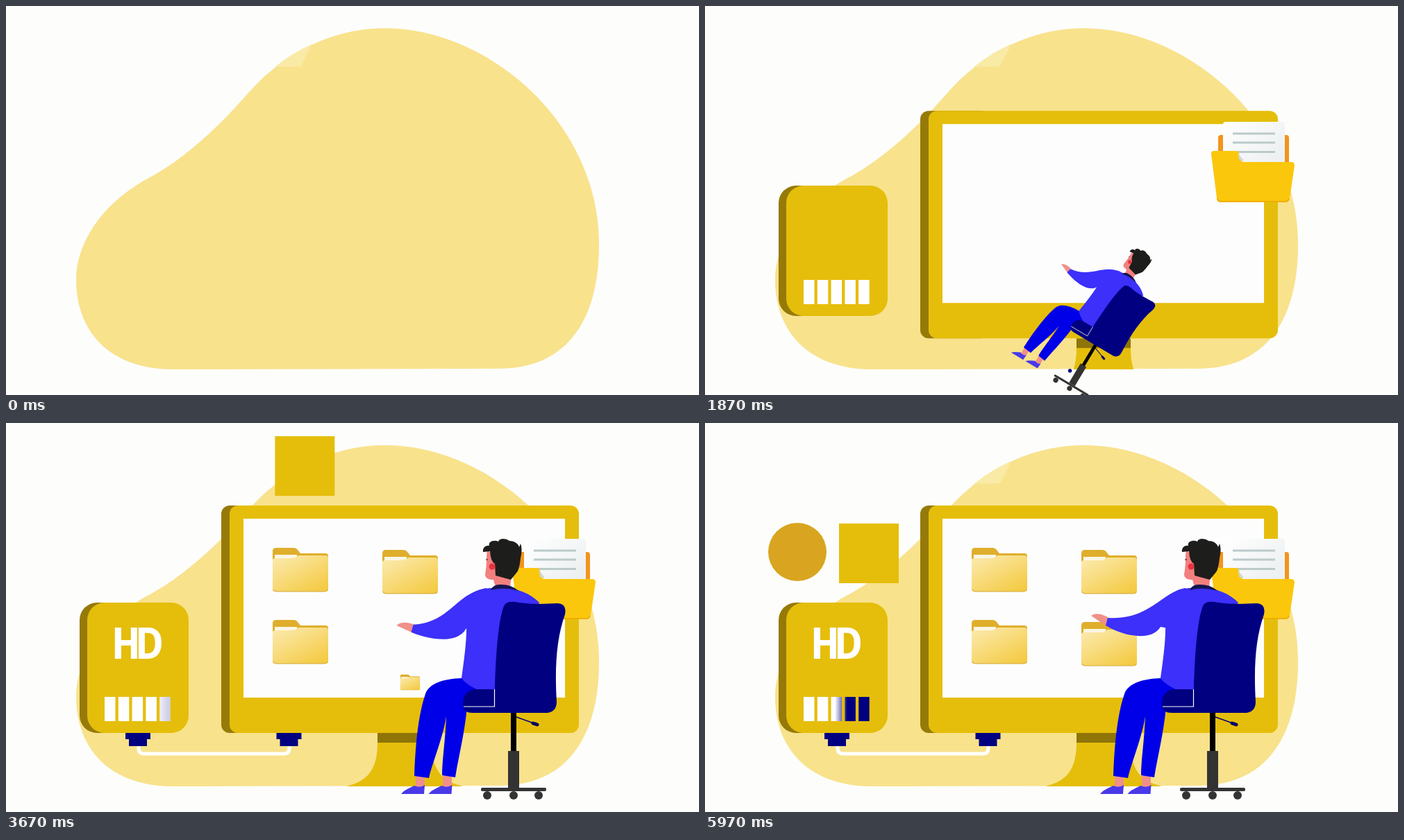
These frames come from a looping animation (998 by 561 pixels, 6010 ms). An HTML page:

```html
<!DOCTYPE html>
<html lang="en">
<head>
<meta charset="utf-8">
<title>Backup drive</title>
<style>
  html, body { margin: 0; width: 100%; height: 100%; overflow: hidden; background: #fdfdfc; }
  svg { display: block; width: 100vw; height: 100vh; }
  text { font: 700 63px "Noto Sans Mono", "DejaVu Sans Mono", monospace; font-stretch: 75%; fill: #fff; text-anchor: middle; }
</style>
</head>
<body>
<svg viewBox="0 0 998 561">
  <defs>
    <clipPath id="floor"><rect width="998" height="524"/></clipPath>
    <linearGradient id="sheen" x1="0" y1="0" x2=".8" y2="1">
      <stop stop-color="#fcebb2"/><stop offset="1" stop-color="#f4cb45"/>
    </linearGradient>
    <linearGradient id="paper" x1="0" y1="0" x2="1" y2="1">
      <stop stop-color="#fff"/><stop offset="1" stop-color="#e6ebed"/>
    </linearGradient>
    <linearGradient id="charge" gradientUnits="userSpaceOnUse" y1="0" y2="0">
      <stop id="left"/><stop id="right" offset="1"/>
    </linearGradient>
    <path id="plug" fill="#000080" d="M-18 447h36v9h-5v10h-26v-10h-5z"/>
    <g id="folder">
      <path fill="#dfae2c" d="M-40-27q0-5 5-5h25q4 0 6 3l4 5h36q4 0 4 4v47q0 4-4 4h-72q-4 0-4-4z"/>
      <path fill="#fbf6e4" d="M-37-22h32v6h-32z"/>
      <path fill="url(#sheen)" d="M-40-14q0-3 4-3h24q5 0 9-4h39q4 0 4 4v44q0 4-4 4h-72q-4 0-4-4z"/>
      <path fill="none" stroke="#d3a63a" d="M-39 28q1 3 4 3h70q3 0 4-3"/>
    </g>
  </defs>

  <path fill="#f8e28c" d="M240 524C150 524 101 470 101 395C101 340 140 285 200 251C260 220 310 170 352 122C397 72 465 32 546 32C694 32 855 168 854 345C854 450 810 523 710 523Z"/>
  <path fill="#f9eaa6" d="M387 88Q413 67 441 55L425 87Z"/>

  <use id="plugB" href="#plug"/>
  <g clip-path="url(#floor)">
    <g id="monitor">
      <path fill="#e5be0b" d="M535 455V461C535 503 518 517 490 524H658C630 517 613 503 613 461V455Z"/>
      <path fill="#8f7408" d="M535 447h78v14h-78z"/>
      <rect x="310" y="119" width="100" height="328" rx="12" fill="#967a08"/>
      <rect x="322" y="119" width="503" height="328" rx="12" fill="#e5be0b"/>
      <path fill="#fdfdfd" d="M342 138h463v258h-463z"/>
    </g>
  </g>
  <g id="icons"></g>

  <path id="cable" fill="none" stroke="#fff" stroke-width="5" pathLength="1" stroke-dasharray="1 2" d="M191 464V469Q191 477 199 477H400Q408 477 408 469V466"/>
  <use id="plugA" href="#plug"/>
  <g id="drive"><g transform="translate(-184.5 -353)">
    <rect x="106" y="259" width="120" height="188" rx="25" fill="#967a08"/>
    <rect x="117" y="259" width="146" height="188" rx="25" fill="#e5be0b"/>
    <path id="bars" fill="url(#charge)"/>
  </g></g>
  <g id="H"><text y="23">H</text></g>
  <g id="D"><text y="23">D</text></g>

  <rect id="square" x="-43" y="-43" width="86" height="86" fill="#e5be0b"/>
  <circle id="round" r="42" fill="#d9a520"/>

  <g id="files"><g transform="translate(-789 -225)">
    <rect x="739" y="186" width="102" height="80" rx="4" fill="#f3941c"/>
    <rect x="746" y="167" width="89" height="90" rx="4" fill="url(#paper)"/>
    <path stroke="#bccaca" stroke-width="3" d="M760 184h61M760 197h61M760 210.500h61"/>
    <path fill="#fbc70c" d="M729 213q0-4 4-4h31q4 0 5 4l5 12h70q5 0 5 5l-7 47q-1 6-7 6h-92q-6 0-6-6z"/>
    <path fill="#cfd8da" d="M767 212l9 11h-6z"/>
    <path fill="none" stroke="#efae00" stroke-width="2" d="M738 278q1 4 5 4h92q5 0 6-4"/>
  </g></g>

  <circle id="ball" r="64.500" fill="#000080"/>

  <g id="man"><g transform="translate(-731 -535)">
    <path fill="#f0908a" d="M590 508h13v18h-13zM629 508h13v18h-13z"/>
    <path id="shoe" fill="#4839ea" d="M569 535Q572 530 588 523Q596 527 603 522L602 535Z"/>
    <use href="#shoe" x="39.500"/>
    <path fill="#0000e8" d="M657 368C630 369 612 375 605 388C595 415 590 455 588 509L609 512C614 490 629 455 634 423C633 455 628 485 628 508L647 511C652 480 660 450 664 410L690 386Z"/>
    <path fill="#f2807f" d="M693 183C691 195 693 204 690 218Q690 226 702 226L706 240H726L728 212Z"/>
    <path fill="#1d1d1b" d="M687 186C686 180 691 176 696 177C694 171 703 168 709 171C711 165 721 167 725 170C732 170 738 174 739 179L741 174C744 182 742 190 741 195C740 205 738 213 736 215L727 226L705 220L704 203Q698 200 697 185Z"/>
    <circle cx="700" cy="207" r="4.500" fill="#e63340"/>
    <path stroke="#1d1d1b" d="M691 197h3"/>
    <path fill="#3c30fa" d="M688 239C710 236 745 235 768 259L730 390H690C670 381 660 374 656 368C660 340 664 310 663 288C668 265 676 245 688 239Z"/>
    <path fill="#15154e" d="M698 241Q702 232 713 233Q728 233 738 242Q718 236 698 241Z"/>
    <path id="hand" fill="#f0908a" d="M2 0C-6-3-18-5-24 2L-12 7L0 12Z"/>
    <path id="sleeve" fill="#3c30fa"/>
    <path d="M727 415h8v60h-8z"/>
    <g fill="#333">
      <path d="M723 473h16v53h-16z"/>
      <rect x="684" y="526" width="94" height="5" rx="2"/>
      <circle cx="693" cy="537" r="6"/><circle cx="731" cy="537" r="6"/><circle cx="767" cy="537" r="6"/>
    </g>
    <path stroke="#000080" stroke-width="1.500" d="M735 424L760 433"/>
    <path stroke="#000060" stroke-width="5" stroke-linecap="round" d="M759 433L765 435"/>
    <path fill="#000080" d="M716 267Q718 256 733 258C755 262 775 261 795 260Q808 261 805 276C793 310 790 350 793 402Q793 416 780 418H672Q659 418 658 408Q657 386 675 384H704C705 345 708 290 716 267Z"/>
    <path fill="none" stroke="#fff" stroke-width="1.200" d="M659 409H703.500V384"/>
  </g></g>
</svg>

<script>
const LOOP = 6010;
const BAR_CYCLE = 594;
const $ = id => document.getElementById(id);
const ramp = (t, start, end) => Math.min(1, Math.max(0, (t - start) / (end - start)));
const easeOut = p => 1 - (1 - p) ** 3;
const easeInOut = (p, n = 2) => p < .5 ? (2 * p) ** n / 2 : 1 - (2 - 2 * p) ** n / 2;
const swing = (t, start, end) => easeInOut(ramp(t, start, end));
const mix = (a, b, k) => a + (b - a) * k;

function place(el, x, y, scale = 1, turn = 0) {
  el.style.display = scale > .004 ? "" : "none";
  el.setAttribute("transform", `translate(${x} ${y}) rotate(${turn}) scale(${scale})`);
}

// Spins in from an offset while growing; may dip below its place before settling.
function tumble(id, p, x, y, { dx, dy, dip = 0, spin }) {
  const rest = 1 - p;
  const sink = dip * Math.sin(Math.PI * p ** 3);
  place($(id), x + dx * rest ** 2, y + dy * rest ** 2 + sink, Math.sin(p * Math.PI / 2), spin * rest ** 3);
}

// Flies from behind the man's head over the monitor to its place.
function hop(id, p, x, y, height) {
  const e = easeInOut(p);
  place($(id), mix(718, x, e), mix(188, y, e) - height * Math.sin(Math.PI * e), Math.min(1, p / .147));
}

function drawLetter(id, x, t, start) {
  const s = easeOut(ramp(t, start, start + 620));
  place($(id), x, 316.5 - 30 * (1 - s), s);
}

function drawPlug(id, x, t, start) {
  const p = ramp(t, start, start + 200);
  place($(id), x, -22 * (1 - easeOut(p)), p > 0 ? 1 : 0);
}

// Navy sweeps across the bars, then white sweeps over it.
function drawBars(t) {
  const phase = ((t + LOOP) / BAR_CYCLE + .61) % 1;
  const filling = phase < .5;
  const sweep = phase * 2 % 1;
  const front = 135 + 109 * sweep;
  const level = ramp(t, 1950, 2370);
  const shade = a => `rgb(${[255, 255, 255 - 127 * a * level].map((v, i) => i < 2 ? v * (1 - a * level) : v)})`;
  const rest = 1 - .9 * ramp(sweep, .58, .84);
  $("charge").setAttribute("x1", front - 9);
  $("charge").setAttribute("x2", front + 9);
  $("left").setAttribute("stop-color", shade(filling ? 1 : 0));
  $("right").setAttribute("stop-color", shade(filling ? 0 : rest));
}

function drawArm(t) {
  const lift = swing(t, 2270, 2770) - swing(t, 2900, 4000) + swing(t, 4470, 5070);
  const x = 588 - 8 * lift, y = 293 - 12 * lift;
  place($("hand"), x, y, 1, 12 * lift);
  $("sleeve").setAttribute("d", `M692 238C${645 + 15 * lift} ${246 - 4 * lift} 640 ${288 - 3 * lift} ${x} ${y}`
    + `l-3 11c24 ${9 + 6 * lift} 66 ${17 + 7 * lift} 79 ${9 * lift - 7}L690 300Z`);
}

// The ball rolls in along the floor and turns into the seated man.
function drawMan(t) {
  const x = 731 - 694 * (1 - ramp(t, 1000, 3119)) ** 2.3;
  const lean = 44 * (1 - ramp(t, 1700, 2750)) ** 2;
  place($("ball"), x, 526 + 101 * (1 - ramp(t, 1100, 1400)) ** 2, 1 - swing(t, 1700, 1900));
  place($("man"), x, 535 + lean / 2, easeOut(ramp(t, 1750, 2200)), lean);
  drawArm(t);
}

const icons = [0, 1, 2, 3].map(i => {
  const el = document.createElementNS("http://www.w3.org/2000/svg", "use");
  el.setAttribute("href", "#folder");
  $("icons").append(el);
  return el;
});

function drawIcon(el, i, t) {
  const col = i >> 1, row = i % 2;
  const start = 2060 + 510 * i;
  const s = easeOut(ramp(t, start, start + 600));
  place(el, 424 + 158 * col, mix(455 - 17 * i, 212 + 104 * row + 3 * col, s), s);
}

let bars = "";
for (let i = 0; i < 5; i++) bars += `M${142 + 19.8 * i} 395h15.500v35h-15.500z`;
$("bars").setAttribute("d", bars);

function draw(t) {
  const fly = ramp(t, 1290, 1850);
  tumble("drive", ramp(t, 30, 1650), 184.5, 353, { dx: 115, dy: -190, dip: 25, spin: -150 });
  tumble("files", fly, 789, 225, { dx: 4, dy: 201, spin: -121 });
  $("files").style.filter = fly < .6 ? "blur(2px)" : "none";

  place($("monitor"), 0, 405 * (1 - easeInOut(ramp(t, 1390, 2050), 3)));
  hop("square", ramp(t, 3120, 4120), 236, 188, 132);
  hop("round", ramp(t, 4320, 5690), 133, 186, 142);
  icons.forEach((el, i) => drawIcon(el, i, t));

  drawPlug("plugA", 190, t, 2000);
  drawPlug("plugB", 407.5, t, 2800);
  const run = swing(t, 2235, 2800);
  $("cable").style.display = run > 0 ? "" : "none";
  $("cable").setAttribute("stroke-dashoffset", 1 - run);

  drawLetter("D", 207, t, 2140);
  drawLetter("H", 173, t, 2530);
  drawBars(t);
  drawMan(t);
}

const begin = performance.now();
function tick() {
  draw((performance.now() - begin) % LOOP);
  requestAnimationFrame(tick);
}
tick();
</script>
</body>
</html>
```
